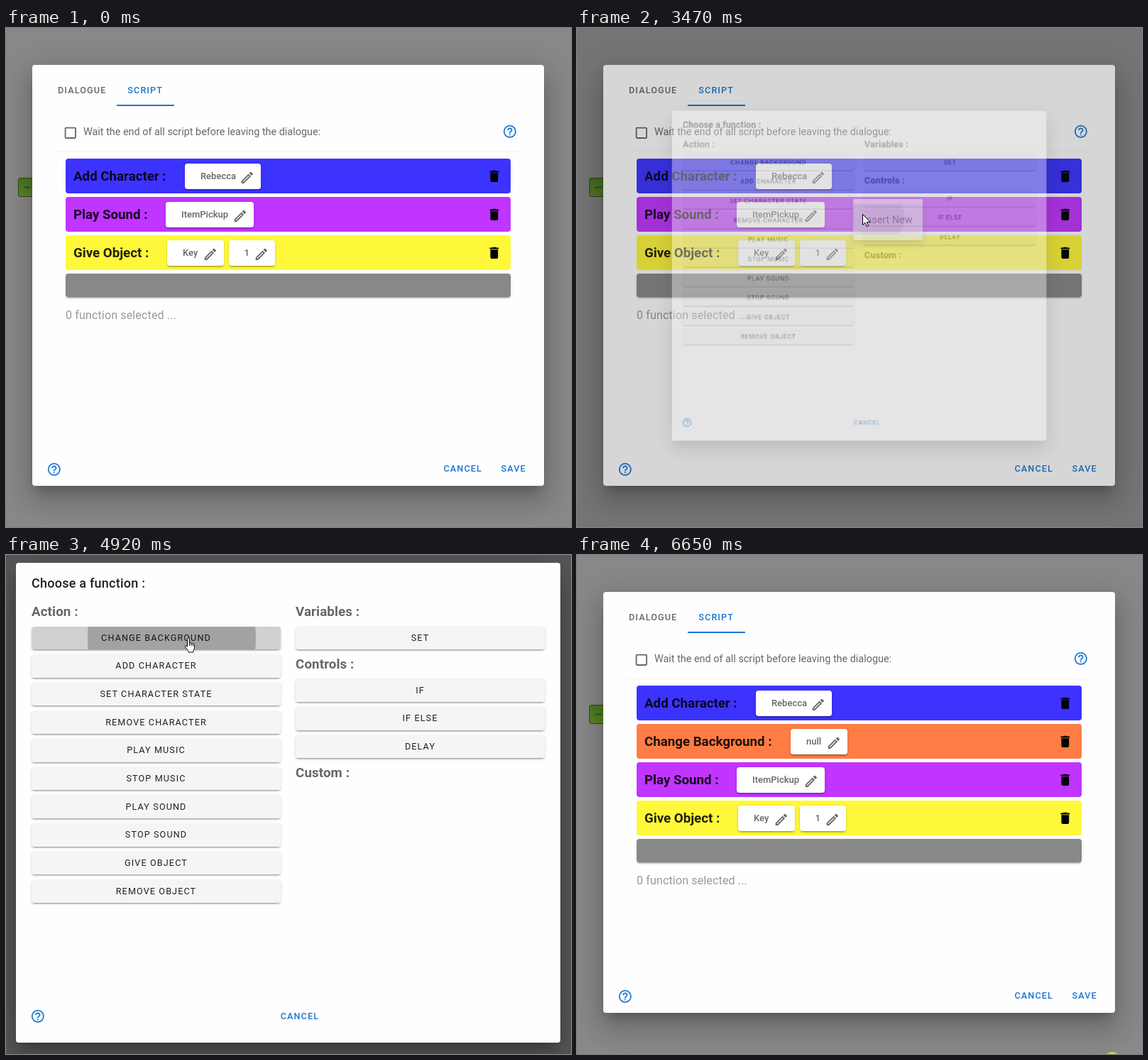
These frames come from a looping animation (796 by 703 pixels, 6720 ms). An HTML page:

```html
<!DOCTYPE html>
<html lang="en">
<head>
<meta charset="utf-8">
<title>Script editor</title>
<style>
html, body { margin: 0; width: 100%; height: 100%; overflow: hidden; }
#stage {
  position: relative; width: 796px; height: 703px; overflow: hidden;
  background: #888; font: 500 12.6px/20px Roboto, sans-serif; color: rgba(0,0,0,.87);
}
#stage * { position: absolute; box-sizing: border-box; white-space: pre; }
.card {
  background: #fefefe; border-radius: 4px;
  box-shadow: 0 10px 14px -6px rgba(0,0,0,.2), 0 22px 34px 3px rgba(0,0,0,.14), 0 8px 41px 7px rgba(0,0,0,.12);
}
.fill { left: 0; top: 0; width: 100%; height: 100%; }
.caps { letter-spacing: .0893em; }
.blue { color: #1976d2; }
.dim { color: rgba(0,0,0,.6); }
.head { font-size: 18.72px; font-weight: 700; }
.sub { font-size: 18.72px; font-weight: 700; letter-spacing: .13px; color: rgba(0,0,0,.6); }
.title { font-size: 18px; letter-spacing: .0125em; }
.body { font-size: 14.4px; font-weight: 400; }
.note { font-size: 16px; font-weight: 400; letter-spacing: .15px; color: #999; }
.chipText { font-size: 13px; }
.row { left: 84px; width: 627px; height: 49px; border-radius: 4px; overflow: hidden; }
.chip { top: 7px; height: 36px; border-radius: 4px; background: #fff; }
.chip, .btn, .bar {
  box-shadow: 0 3px 1px -2px rgba(0,0,0,.2), 0 2px 2px rgba(0,0,0,.14), 0 1px 4px rgba(0,0,0,.12);
}
.bar { left: 84px; top: 346px; width: 627px; height: 32.5px; border-radius: 4px; background: #888; overflow: visible; }
.btn {
  width: 351px; height: 32.4px; border-radius: 4px; background: #f5f5f5;
  text-align: center; line-height: 32.4px; font-weight: 400; overflow: hidden;
}
.btn span { left: 0; width: 100%; }
.clip { overflow: hidden; border-radius: 4px; }
.tint { background: #000; opacity: 0; border-radius: 4px; }
.ripple { border-radius: 50%; background: #000; opacity: 0; }

.anim { animation: 6.72s linear infinite; }
.hop { animation-timing-function: step-end; }
#shift { animation-name: shift; }
#added { animation-name: added; }
#barTint { animation-name: barTint; }
#rowTint { animation-name: rowTint; }
#rowRipple { animation-name: rowRipple; }
#menu {
  left: 389px; top: 241px; width: 98px; height: 58px; background: #fff; animation-name: menu;
  box-shadow: 0 4px 5px -3px rgba(0,0,0,.2), 0 7px 9px 1px rgba(0,0,0,.14), 0 3px 13px 2px rgba(0,0,0,.12);
}
#itemTint { animation-name: itemTint; }
#itemRipple { animation-name: itemRipple; }
#shade { background: #212121; animation-name: shade; }
#picker { left: 14px; top: 11px; width: 767px; height: 676px; animation-name: picker; }
#btnTint { animation-name: btnTint; }
#btnRipple { animation-name: btnRipple; }
.halo { width: 22px; height: 22px; border-radius: 50%; opacity: 0; background: rgba(255,240,0,.7); }
#haloRight { background: rgba(255,30,60,.6); animation-name: haloRight; }
#haloItem { animation-name: haloItem; }
#haloBtn { animation-name: haloBtn; }
#haloEnd { animation-name: haloEnd; }
#cursor { left: 0; top: 0; width: 18px; height: 24px; animation-name: cursor; }
#hand { animation-name: hand; }
#arrow { animation-name: arrow; }

@keyframes shift { 0% { transform: none } 73.44%, 100% { transform: translateY(54px) } }
@keyframes added { 0% { opacity: 0 } 73.44%, 100% { opacity: 1 } }
@keyframes barTint { 0%, 8.4% { opacity: 0 } 9.4%, 10% { opacity: .08 } 12.5%, 100% { opacity: 0 } }
@keyframes rowTint { 0%, 27.5% { opacity: 0 } 32.4%, 44% { opacity: .05 } 47.4%, 100% { opacity: 0 } }
@keyframes rowRipple {
  0%, 36.9% { opacity: 0; transform: scale(.3); animation-timing-function: cubic-bezier(.4,0,.2,1) }
  38.5% { opacity: .22 }
  41.4% { transform: scale(1) }
  39.5%, 43.2% { opacity: .25 }
  47.4%, 100% { opacity: 0; transform: scale(1) }
}
@keyframes menu { 0%, 38.7% { opacity: 0 } 41.7%, 50.4% { opacity: 1 } 53.4%, 100% { opacity: 0 } }
@keyframes itemTint { 0%, 42.5% { opacity: 0 } 46%, 53.4% { opacity: .06 } 54%, 100% { opacity: 0 } }
@keyframes itemRipple {
  0%, 49.2% { opacity: 0; transform: translate(-35px,-8px) scale(.3) }
  50% { opacity: .14 }
  53.4% { opacity: .14; transform: none }
  54%, 100% { opacity: 0; transform: none }
}
@keyframes shade {
  0%, 50.3% { opacity: 0; animation-timing-function: cubic-bezier(.4,0,.2,1) }
  54.76%, 73.44% { opacity: .47; animation-timing-function: cubic-bezier(.4,0,.2,1) }
  76.8%, 100% { opacity: 0 }
}
@keyframes picker {
  0%, 50.3% { opacity: 0; transform: scale(.5); animation-timing-function: cubic-bezier(.4,0,.2,1) }
  54.76%, 73.44% { opacity: 1; transform: scale(1); animation-timing-function: cubic-bezier(.4,0,.2,1) }
  76.8%, 100% { opacity: 0; transform: scale(.5) }
}
@keyframes btnTint { 0%, 71.6% { opacity: 0 } 73%, 76.8% { opacity: .15 } 77%, 100% { opacity: 0 } }
@keyframes btnRipple {
  0%, 71.6% { transform: translateX(46px) scale(.3); animation-timing-function: cubic-bezier(.4,0,.2,1) }
  71.6% { opacity: 0 }
  72.4%, 76.8% { opacity: .22 }
  76.07% { transform: none }
  77%, 100% { opacity: 0; transform: none }
}
@keyframes haloRight { 0% { opacity: 0 } 37.4% { opacity: 1 } 38.7%, 100% { opacity: 0 } }
@keyframes haloItem { 0% { opacity: 0 } 49.5% { opacity: 1 } 51%, 100% { opacity: 0 } }
@keyframes haloBtn { 0% { opacity: 0 } 72.1% { opacity: 1 } 73.1%, 100% { opacity: 0 } }
@keyframes haloEnd { 0% { opacity: 0 } 98.9%, 100% { opacity: 1 } }
@keyframes cursor {
  0%, 4.6% { transform: translate(735px,720px) }
  4.91% { transform: translate(708px,688px); animation-timing-function: cubic-bezier(.3,.3,.5,1) }
  14.29%, 14.9% { transform: translate(439px,272px); animation-timing-function: ease-in-out }
  22.1%, 41.8% { transform: translate(389px,242px); animation-timing-function: ease-in-out }
  46%, 58.9% { transform: translate(402px,262px); animation-timing-function: cubic-bezier(.1,.2,.5,1) }
  67.5%, 79.3% { transform: translate(251px,116px); animation-timing-function: ease-in }
  81.4% { transform: translate(272px,193px) }
  82.6% { transform: translate(312px,262px) }
  85.6% { transform: translate(420px,418px) }
  89% { transform: translate(610px,605px) }
  91.8% { transform: translate(697px,664px); animation-timing-function: ease-out }
  95.9% { transform: translate(738px,703px) }
  98%, 100% { transform: translate(754px,711px) }
}
@keyframes hand {
  0% { opacity: 0 } 9% { opacity: 1 } 38.7% { opacity: 0 } 59.6% { opacity: 1 } 85.9%, 100% { opacity: 0 }
}
@keyframes arrow {
  0% { opacity: 1 } 9% { opacity: 0 } 38.7% { opacity: 1 } 59.6% { opacity: 0 } 85.9%, 100% { opacity: 1 }
}
</style>
</head>
<body>
<div id="stage"></div>
<script>
const icons = {
  help: 'M11,18H13V16H11V18M12,2A10,10 0 0,0 12,22A10,10 0 0,0 12,2M12,20A8,8 0 0,1 12,4A8,8 0 0,1 12,20M12,6A4,4 0 0,0 8,10H10A2,2 0 0,1 14,10C14,12 11,11.75 11,15H13C13,12.75 16,12.5 16,10A4,4 0 0,0 12,6Z',
  bin: 'M19,4H15.5L14.5,3H9.5L8.5,4H5V6H19M6,19A2,2 0 0,0 8,21H16A2,2 0 0,0 18,19V7H6V19Z',
  pen: 'M14.06,9L15,9.94L5.92,19H5V18.08L14.06,9M17.66,3C17.41,3 17.15,3.1 16.96,3.29L15.13,5.12L18.88,8.87L20.71,7.04C21.1,6.65 21.1,6 20.71,5.63L18.37,3.29C18.17,3.09 17.92,3 17.66,3M14.06,6.19L3,17.25V21H6.75L17.81,9.94L14.06,6.19Z',
  box: 'M19,3H5A2,2 0 0,0 3,5V19A2,2 0 0,0 5,21H19A2,2 0 0,0 21,19V5A2,2 0 0,0 19,3M19,5V19H5V5H19Z'
};

// Text is placed by its left edge and the middle of its line.
const text = (x, y, s, cls) => `<span class="${cls}" style="left:${x}px;top:${y - 10}px">${s}</span>`;

const icon = (name, x, y, color) =>
  `<svg viewBox="0 0 24 24" width="21.6" height="21.6" style="left:${x - 10.8}px;top:${y - 10.8}px">
    <path fill="${color}" fill-rule="evenodd" d="${icons[name]}"/></svg>`;

const rect = (x, y, w, h, color, more = '') =>
  `<div style="left:${x}px;top:${y}px;width:${w}px;height:${h}px;background:${color}">${more}</div>`;

const ripple = (id, cx, cy, r) =>
  `<div id="${id}" class="ripple anim" style="left:${cx - r}px;top:${cy - r}px;width:${2 * r}px;height:${2 * r}px"></div>`;

const tint = id => `<div id="${id}" class="tint fill anim"></div>`;

const halo = (id, x, y) => `<div id="${id}" class="halo anim hop" style="left:${x - 11}px;top:${y - 11}px"></div>`;

const chip = ([x, w, s]) => `<div class="chip" style="left:${x - 84}px;width:${w}px">
  ${text(22, 18, s, 'chipText dim')}${icon('pen', w - 19.5, 20, '#666')}</div>`;

const row = (y, color, name, chips, more = '') => `<div class="row" style="top:${y}px;background:${color}">
  ${text(11, 25, name, 'head')}${chips.map(chip).join('')}${icon('bin', 603.7, 25, '#000')}${more}</div>`;

const button = (x, y, s, more = '') =>
  `<div class="btn caps" style="left:${x}px;top:${y - 16.2}px">${more}<span>${s}</span></div>`;

const blue = '#1976d2';

const editor = `
  <div class="card" style="left:37px;top:52px;width:721px;height:593px"></div>
  ${text(73, 87.5, 'DIALOGUE', 'caps dim')}
  ${text(171.3, 87.5, 'SCRIPT', 'caps blue')}
  ${rect(156, 108, 81, 2, blue)}
  ${icon('box', 91, 147.7, '#666')}
  ${text(109, 147.3, 'Wait the end of all script before leaving the dialogue:', 'body dim')}
  ${icon('help', 709.3, 146, blue)}
  ${rect(70, 174, 655, 1, '#f2f2f2')}
  ${row(184, '#3d33ff', 'Add Character :', [[252, 107, 'Rebecca']])}
  <div id="added" class="fill anim hop">${row(238, '#ff7d45', 'Change Background :', [[301, 80, 'null']])}</div>
  <div id="shift" class="fill anim hop">
    ${row(238, '#c035ff', 'Play Sound :', [[225, 124, 'ItemPickup']],
      tint('rowTint') + ripple('rowRipple', 313.5, 24.5, 314.6))}
    ${row(292, '#fff83a', 'Give Object :', [[227, 80, 'Key'], [313.5, 65.5, '1']])}
    <div class="bar">${tint('barTint')}</div>
    ${text(84, 404.5, '0 function selected ...', 'note')}
  </div>
  ${icon('help', 67.5, 621.7, blue)}
  ${text(616.5, 621.2, 'CANCEL', 'caps blue')}
  ${text(697.5, 621.2, 'SAVE', 'caps blue')}`;

const menu = `<div id="menu" class="anim">
  <div class="clip" style="left:0;top:7px;width:98px;height:43px">
    ${tint('itemTint')}${ripple('itemRipple', 49, 21.5, 54)}</div>
  ${text(14.4, 29.5, 'Insert New', 'body')}</div>`;

const actions = ['CHANGE BACKGROUND', 'ADD CHARACTER', 'SET CHARACTER STATE', 'REMOVE CHARACTER', 'PLAY MUSIC',
  'STOP MUSIC', 'PLAY SOUND', 'STOP SOUND', 'GIVE OBJECT', 'REMOVE OBJECT'];
const pressed = tint('btnTint') + ripple('btnRipple', 175.5, 16.2, 176);

const picker = `<div id="picker" class="card anim">
  ${text(22, 29, 'Choose a function :', 'title')}
  ${text(22, 69.3, 'Action :', 'sub')}
  ${actions.map((s, i) => button(22, 106 + i * 39.65, s, i ? '' : pressed)).join('')}
  ${text(394, 69.3, 'Variables :', 'sub')}
  ${button(394, 106, 'SET')}
  ${text(394, 143.3, 'Controls :', 'sub')}
  ${['IF', 'IF ELSE', 'DELAY'].map((s, i) => button(394, 179.7 + i * 39.65, s)).join('')}
  ${text(394, 296.3, 'Custom :', 'sub')}
  ${icon('help', 31, 639, blue)}
  ${text(372.7, 639, 'CANCEL', 'caps blue')}</div>`;

const pointer = (id, d) => `<svg id="${id}" class="anim hop" width="18" height="24" style="left:0;top:0">
  <path fill="#fff" stroke="#000" stroke-linejoin="round" d="${d}"/></svg>`;

const cursor = `<div id="cursor" class="anim">
  ${pointer('arrow', 'M.5.5V15.5L4 12.2 6.3 17.4 8.6 16.4 6.3 11.4H11z')}
  ${pointer('hand', 'M4.5 13V2.2a1.5 1.5 0 0 1 3 0V8.5c0-1 2.4-1 2.5.4c.4-1 2.3-.8 2.4.4c.5-.8 2-.5 2 .9v4.8c0 2-1.8 3-1.8 6H6.2c0-2.5-3-4.6-4.6-7.8c-.7-1.6 1-2.3 2.9-.2zM7.5 8.5v3.5M10 9v3M12.4 9.4v2.8')}
  </div>`;

const node = `<div style="left:17px;top:211px;width:40px;height:27px;border:1px solid #34451c;border-radius:3px;
  background:linear-gradient(#4c7a22,#5a8428)">${text(7, 12, 'wait', 'tiny').replace('style="', 'style="font-size:5px;color:#2c4212;')}</div>`;

document.getElementById('stage').innerHTML = node + editor + menu +
  '<div id="shade" class="fill anim"></div>' + picker +
  halo('haloRight', 389, 242) + halo('haloItem', 402, 262) + halo('haloBtn', 257, 116) + halo('haloEnd', 754, 711) +
  cursor;
</script>
</body>
</html>
```
